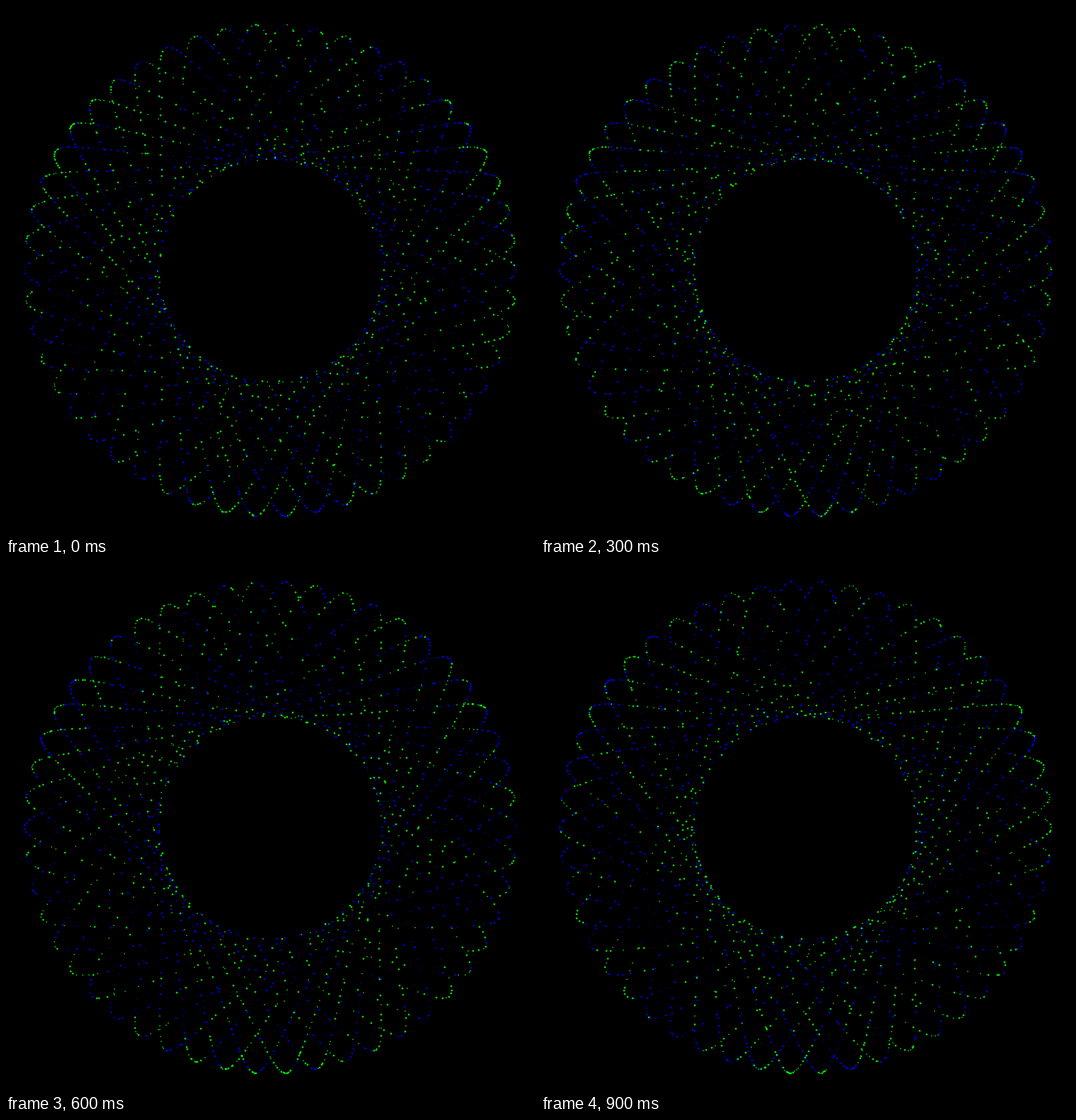
Animation of 748x748 px, one loop 1 s. Source, as an HTML page with a canvas:

```html
<!DOCTYPE html>
<html lang="en">
<head>
<meta charset="utf-8">
<title>Orbiting dots</title>
<style>
  html, body { margin: 0; width: 100%; height: 100%; overflow: hidden; background: #000; }
  canvas { display: block; width: 100%; height: 100%; }
</style>
</head>
<body>
<canvas id="stage" width="748" height="748"></canvas>
<script>
const ctx = document.getElementById('stage').getContext('2d');
const TAU = Math.PI * 2;
const SIZE = 748, MID = 374;
const BIG = 252.5, SMALL = 95.5;   // radii of the two circular motions
const FWD = 17, BACK = 33;         // their turns per lap: 50 petals
const COUNT = 2100, BUNCH = 0.35, JITTER = 0.8;
const LOOP = 1000, STEPS = 10;

function random(seed) {
  return () => {
    seed = (seed + 0x6D2B79F5) | 0;
    let n = Math.imul(seed ^ (seed >>> 15), 1 | seed);
    n = (n + Math.imul(n ^ (n >>> 7), 61 | n)) ^ n;
    return ((n ^ (n >>> 14)) >>> 0) / 4294967296;
  };
}

// Short trains of one colour with mixed dot sizes
function makeDots() {
  const rnd = random(41);
  const dots = [];
  while (dots.length < COUNT) {
    const green = rnd() < 0.48;
    const length = 1 + Math.floor(rnd() * 5);
    for (let i = 0; i < length && dots.length < COUNT; i++) {
      const large = rnd() < 0.55;
      dots.push({
        at: (dots.length + rnd() * JITTER) / COUNT,
        color: green ? '#00ff00' : '#0000ff',
        radius: large ? 1.2 : 0.85,
        alpha: large || green ? 1 : 0.8
      });
    }
  }
  return dots;
}

function place(turn) {
  const s = turn * TAU;
  const t = s - BUNCH * Math.cos(s);
  return [
    MID + BIG * Math.cos(FWD * t) + SMALL * Math.cos(BACK * t),
    MID + BIG * Math.sin(FWD * t) - SMALL * Math.sin(BACK * t)
  ];
}

const dots = makeDots();

function draw(step) {
  ctx.globalCompositeOperation = 'source-over';
  ctx.globalAlpha = 1;
  ctx.fillStyle = '#000';
  ctx.fillRect(0, 0, SIZE, SIZE);
  ctx.globalCompositeOperation = 'lighter';
  for (const d of dots) {
    // centre each dot on a pixel so it stays crisp
    const [x, y] = place(d.at + step / STEPS).map(v => Math.floor(v) + 0.5);
    ctx.globalAlpha = d.alpha;
    ctx.fillStyle = d.color;
    ctx.beginPath();
    ctx.arc(x, y, d.radius, 0, TAU);
    ctx.fill();
  }
}

const start = performance.now();
let shown = -1;

function tick() {
  const time = Math.max(0, performance.now() - start) % LOOP;
  const step = Math.floor(time / LOOP * STEPS);
  if (step !== shown) draw(shown = step);
  requestAnimationFrame(tick);
}
tick();
</script>
</body>
</html>
```
